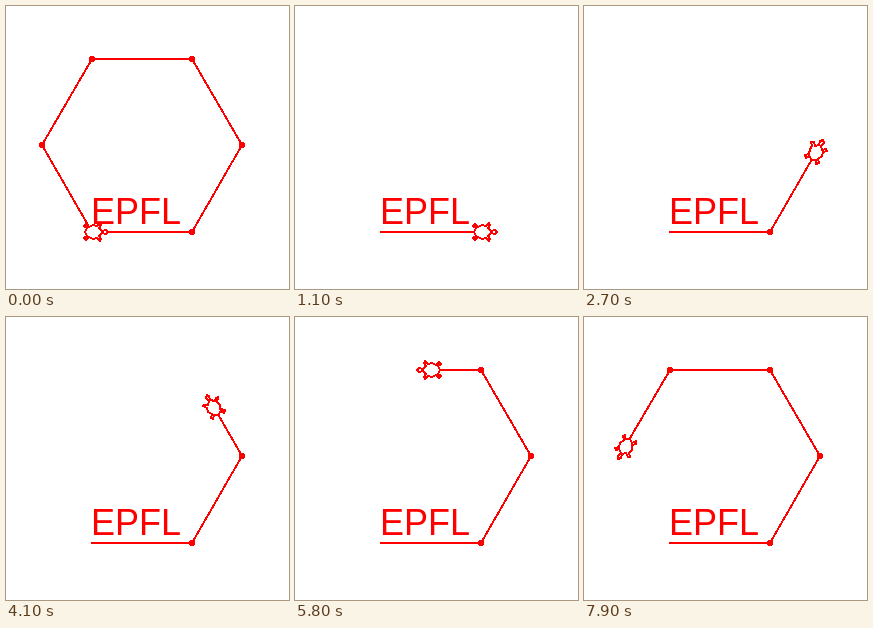
These frames come from a looping animation (283x283 px, 8000 ms). An HTML page:

```html
<!DOCTYPE html>
<html lang="en">
<head>
<meta charset="utf-8">
<title>Turtle hexagon</title>
<style>
  html, body { margin: 0; width: 100%; height: 100%; overflow: hidden; background: #fff; }
  svg { display: block; width: 100%; height: 100%; }
  text { font: 36px "Liberation Sans", Arial, sans-serif; fill: #f00; }
  polyline, polygon { stroke: #f00; stroke-width: 2; stroke-linejoin: round; stroke-linecap: round; }
</style>
</head>
<body>
<svg viewBox="0 0 283 283">
  <rect width="283" height="283" fill="#fff"/>
  <g shape-rendering="crispEdges">
    <polyline id="trail" fill="none"/>
    <g id="dots" fill="#f00"></g>
  </g>
  <text x="85" y="218">EPFL</text>
  <polygon id="turtle" fill="#fff" shape-rendering="crispEdges"/>
</svg>
<script>
const LOOP = 8000, CLEAR = 100, STEP = 31, HOPS = 31, TURNS = 21, SIDE = 100;
// For each side: when the turn begins, when the walk begins
const legs = [[-Infinity, 135], [1177, 1828], [2914, 3565], [4655, 5310], [6365, 7045]];
// Right half of the shell, as [sideways, forward]
const half = [[0, 16], [2, 14], [1, 10], [4, 7], [7, 9], [9, 8], [6, 5], [7, 1],
  [5, -3], [8, -6], [6, -8], [4, -5], [0, -7]];
const shell = half.concat(half.slice(1, -1).reverse().map(([s, f]) => [-s, f]));

const $ = id => document.getElementById(id);
const rad = deg => deg * Math.PI / 180;
const ahead = ([x, y], deg, d) => [x + d * Math.cos(rad(deg)), y - d * Math.sin(rad(deg))];
const round = p => p.map(Math.round);

const corners = [[86, 226]];
for (let i = 0; i < 5; i++) corners.push(ahead(corners[i], i * 60, SIDE));

const dots = corners.slice(1).map(p => {
  const c = document.createElementNS("http://www.w3.org/2000/svg", "circle");
  const [x, y] = round(p);
  c.setAttribute("cx", x);
  c.setAttribute("cy", y);
  c.setAttribute("r", 3);
  $("dots").append(c);
  return c;
});

// Whole steps done since start, as a share of n
const share = (t, start, n) => Math.min(n, Math.max(0, Math.floor((t - start) / STEP))) / n;

function pose(t) {
  if (t < CLEAR) return { pos: corners[0], angle: 0, done: 5, path: [...corners, corners[0]] };
  let i = 0;
  while (i < 4 && t >= legs[i + 1][0]) i++;
  const [turn, walk] = legs[i];
  const angle = i ? (i - 1 + share(t, turn, TURNS)) * 60 : 0;
  const moved = share(t, walk, HOPS);
  const pos = ahead(corners[i], i * 60, moved * SIDE);
  return { pos, angle, done: i + (moved === 1 ? 1 : 0), path: [...corners.slice(0, i + 1), pos] };
}

function draw(t) {
  const { pos, angle, done, path } = pose(t);
  $("trail").setAttribute("points", path.map(round).join(" "));
  dots.forEach((d, i) => d.setAttribute("visibility", i < done ? "visible" : "hidden"));
  $("turtle").setAttribute("points",
    shell.map(([s, f]) => round(ahead(ahead(pos, angle, f), angle - 90, s))).join(" "));
}

let begin = null;
function tick(now) {
  if (begin === null) begin = now;
  draw((now - begin) % LOOP);
  requestAnimationFrame(tick);
}
draw(0);
requestAnimationFrame(tick);
</script>
</body>
</html>
```
